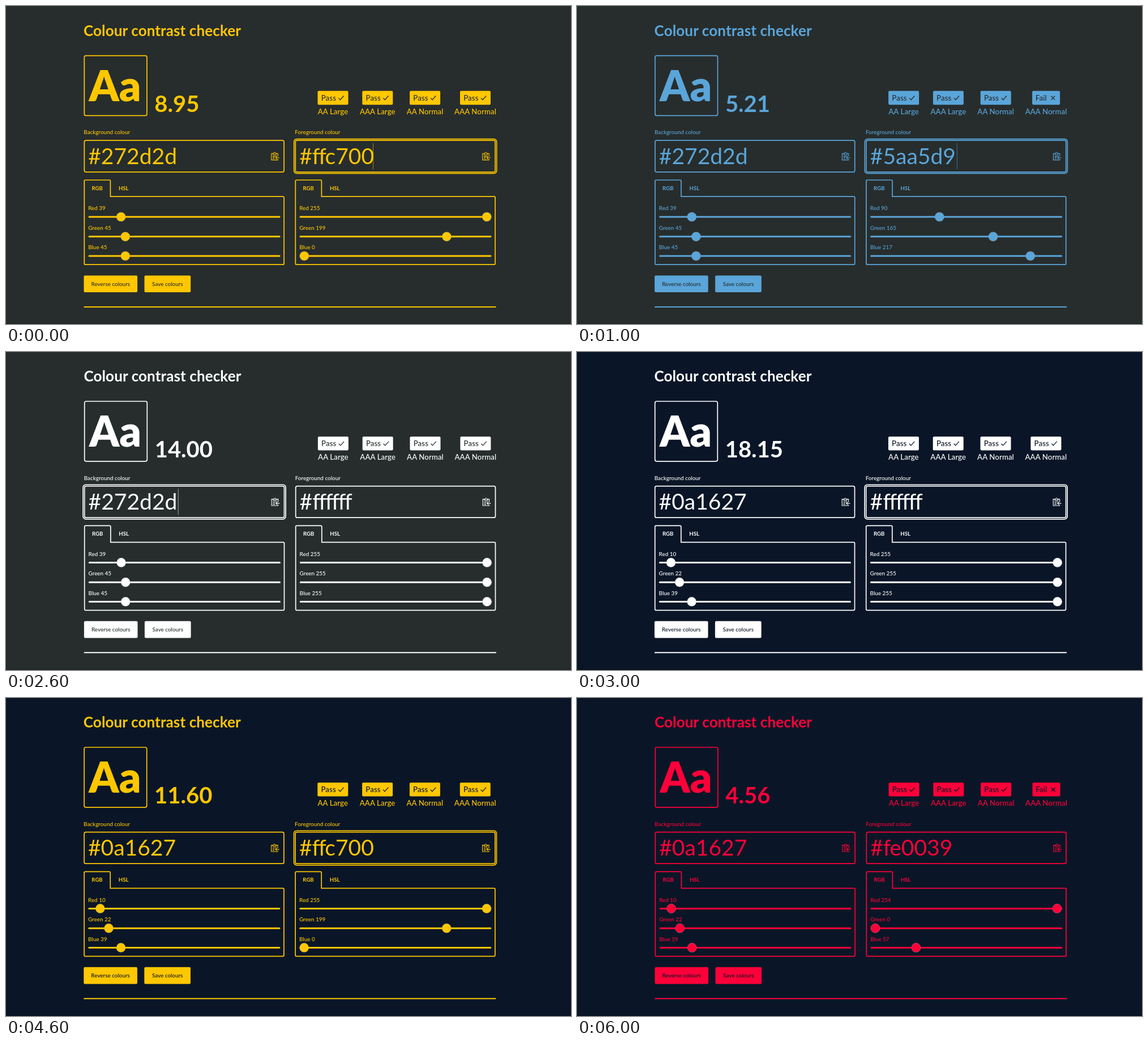
These frames come from a looping animation (998 by 561 pixels, 7 s). An HTML page:

```html
<!DOCTYPE html>
<html lang="en">
<head>
<meta charset="utf-8">
<title>Colour contrast checker</title>
<style>
  html, body { margin: 0; width: 100%; height: 100%; overflow: hidden; }
  svg { display: block; width: 998px; height: 561px; font-family: Lato, "Open Sans", sans-serif; }
  text { fill: var(--fg); white-space: pre; }
  .line { fill: none; stroke: var(--fg); stroke-width: 1.7; }
  .fill { fill: var(--fg); }
  .dark { fill: var(--bg); }
  .mark { fill: none; stroke: var(--bg); stroke-width: 1.3; }
  .icon { fill: none; stroke: var(--fg); stroke-width: 1.1; }
  .track { stroke: var(--fg); stroke-width: 3; stroke-linecap: round; }
  .thumb { fill: var(--fg); stroke: rgba(150, 150, 150, .6); stroke-width: .7; }
  .title { font-size: 26px; font-weight: 700; letter-spacing: .12px; }
  .sample { font-size: 75px; font-weight: 900; }
  .ratio { font-size: 40px; font-weight: 700; }
  .hex { font-size: 39px; }
  .hex tspan { letter-spacing: -2.3px; }
  .small { font-size: 9.9px; font-weight: 500; }
  .tab { font-size: 9.6px; font-weight: 700; }
  .level { font-size: 13.2px; font-weight: 500; letter-spacing: .12px; }
  .mid { text-anchor: middle; }
</style>
</head>
<body>
<svg id="stage" viewBox="0 0 998 561"></svg>
<script>
const STEP = 1000;
const COLUMN = 373;
const stage = document.getElementById('stage');

// focus: 0 = background field, 1 = foreground field; shift: page offset
const states = [
  { bg: '#272d2d', fg: '#ffc700', ratio: '8.95', focus: 1, caret: 648, shift: [0, 0] },
  { bg: '#272d2d', fg: '#5aa5d9', ratio: '5.21', focus: 1, caret: 671.3, shift: [-.4, 0] },
  { bg: '#272d2d', fg: '#ffffff', ratio: '14.00', focus: 0, caret: 303.4, shift: [.4, -.6], edge: true },
  { bg: '#0a1627', fg: '#ffffff', ratio: '18.15', focus: 1, shift: [-.6, -.6] },
  { bg: '#0a1627', fg: '#ffc700', ratio: '11.60', focus: 1, shift: [-.2, -.6] },
  { bg: '#0a1627', fg: '#5aa5d9', ratio: '6.76', focus: 1, shift: [-.8, -.6] },
  { bg: '#0a1627', fg: '#fe0039', ratio: '4.56', focus: -1, shift: [0, -.6] }
];

const levels = [
  ['AA Large', 577.5, 3],
  ['AAA Large', 656.3, 4.5],
  ['AA Normal', 740.1, 4.5],
  ['AAA Normal', 829, 7]
];

const text = (cls, x, y, str) => `<text class="${cls}" x="${x}" y="${y}">${str}</text>`;
const rect = (cls, x, y, w, h, r) =>
  `<rect class="${cls}" x="${x}" y="${y}" width="${w}" height="${h}" rx="${r}"/>`;
const path = (cls, d) => `<path class="${cls}" d="${d}"/>`;

function badge([name, x, min], ratio) {
  const pass = ratio >= min;
  const w = pass ? 54 : 49;
  const mark = pass
    ? `M${x + 10} 162.4l3 3.1 6.2-7`
    : `M${x + 8.8} 158.8l6.8 6.8m0-6.8l-6.8 6.8`;
  return rect('fill', x - w / 2, 149.8, w, 24.4, 2) +
    text('level dark', x - (pass ? 20.8 : 18.8), 166.5, pass ? 'Pass' : 'Fail') +
    path('mark', mark) +
    text('level mid', x, 191, name);
}

function slider(name, value, y) {
  const x = 153.9 + value / 255 * 322.3;
  return text('small', 145.2, y - 11.8, `${name} ${value}`) +
    path('track', `M147 ${y}H483`) +
    `<circle class="thumb" cx="${x}" cy="${y}" r="8.1"/>`;
}

function clipboard() {
  return path('icon', 'M471.5 260.2H468.8V271.6H480.2V270M480.2 265.5V260.2H477.5') +
    path('icon', 'M471.6 262V259.8H473Q474.5 256.8 476 259.8H477.4V262Z') +
    path('icon', 'M471 264.6H478M471 266.9H474.5M471 269.2H474.5') +
    path('icon', 'M483 267.7H476.2M478.8 265.2L476.2 267.7L478.8 270.2');
}

function panel(label, hex, focused, x) {
  const rgb = [1, 3, 5].map(i => parseInt(hex.slice(i, i + 2), 16));
  const shown = hex.replace(/f+/g, run => `<tspan>${run}</tspan>`);
  return `<g transform="translate(${x})">` +
    text('small', 137.3, 226.3, label) +
    rect('line', 138.3, 237.2, 352.8, 55.6, 2.8) +
    (focused ? rect('line', 135.7, 234.6, 358, 60.8, 5) : '') +
    text('hex', 145.2, 279, shown) +
    clipboard() +
    path('line', 'M138.3 454.2V309Q138.3 307 140.3 307H182.4Q184.4 307 184.4 309V336.2' +
      'H489.1Q491.1 336.2 491.1 338.2V454.2Q491.1 456.2 489.1 456.2H140.3Q138.3 456.2 138.3 454.2Z') +
    text('tab mid', 161.2, 325, 'RGB') +
    text('tab mid', 207.8, 325, 'HSL') +
    ['Red', 'Green', 'Blue'].map((n, i) => slider(n, rgb[i], [372, 406.8, 441][i])).join('') +
    '</g>';
}

function button(x, w, label) {
  return rect('fill', x, 475.4, w, 29.6, 2) +
    text('small mid dark', x + w / 2, 493.6, label);
}

function render(s) {
  stage.style.setProperty('--bg', s.bg);
  stage.style.setProperty('--fg', s.fg);
  document.body.style.background = s.bg;
  stage.innerHTML =
    rect('dark', 0, 0, 998, 561, 0) +
    '<rect y="560" width="998" height="1" opacity=".35"/>' +
    (s.edge ? '<rect width="1" height="561" opacity=".35"/>' : '') +
    `<g transform="translate(${s.shift})">` +
    text('title', 137, 52.8, 'Colour contrast checker') +
    rect('line', 138.3, 87.6, 110.6, 105.8, 3) +
    text('sample mid', 192.6, 168, 'Aa') +
    text('ratio', 262.3, 186.5, s.ratio) +
    levels.map(l => badge(l, +s.ratio)).join('') +
    panel('Background colour', s.bg, s.focus === 0, 0) +
    panel('Foreground colour', s.fg, s.focus === 1, COLUMN) +
    (s.caret ? `<rect class="fill" x="${s.caret}" y="242" width=".8" height="46" opacity=".7"/>` : '') +
    button(137.5, 94.6, 'Reverse colours') +
    button(244.5, 81.7, 'Save colours') +
    rect('fill', 137.5, 529.9, 728, 2, 0) +
    '</g>';
}

let current = -1;
function tick() {
  const i = Math.floor(performance.now() / STEP) % states.length;
  if (i !== current) render(states[current = i]);
  requestAnimationFrame(tick);
}
tick();
</script>
</body>
</html>
```
